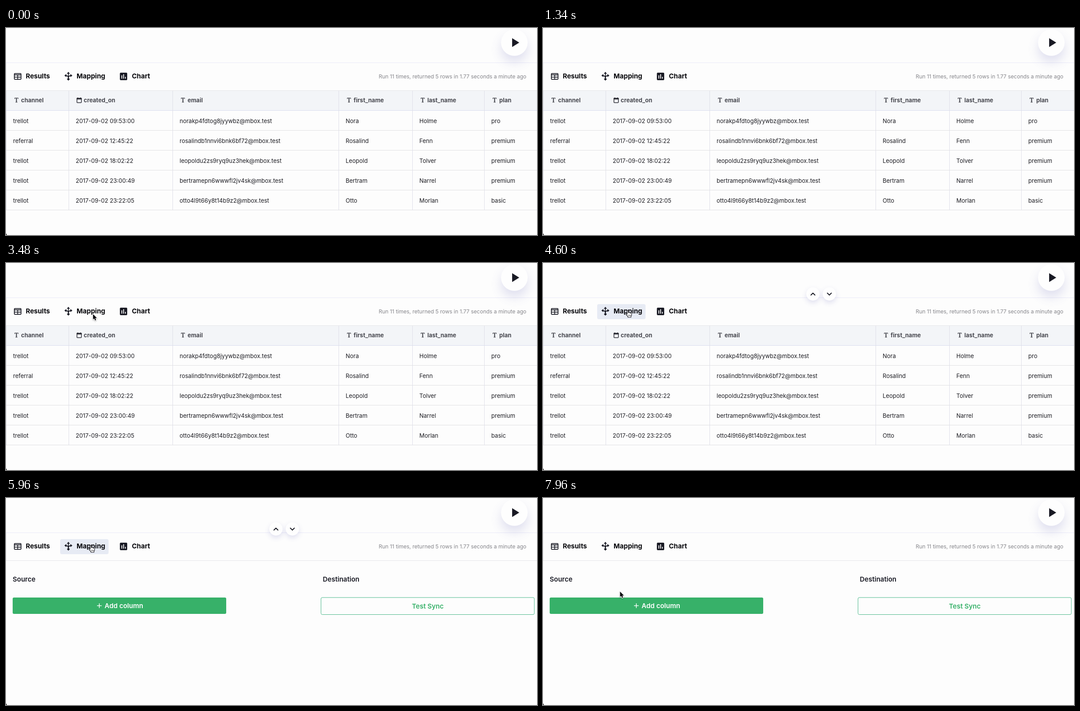
Animation of 1196x468 px, one loop 8000 ms. Source, as an HTML page with a canvas:

```html
<!DOCTYPE html>
<html lang="en">
<head>
<meta charset="utf-8">
<title>Query results and mapping</title>
<style>
  html, body { margin: 0; width: 100%; height: 100%; overflow: hidden; background: #fdfdfd; }
  canvas { display: block; width: 1196px; height: 468px; }
</style>
</head>
<body>
<canvas id="stage" width="1196" height="468"></canvas>
<script>
const ctx = document.getElementById('stage').getContext('2d');
const W = 1196, H = 468, LOOP = 8000;
const PAPER = '#fdfdfd', INK = '#191a24', GREEN = '#37b169';

const TIME = { cursorIn: 2340, hoverOn: 4440, mapping: 5950, hoverOff: 7100 };

const columns = [
  { x: 0, name: 'channel' },
  { x: 141, name: 'created_on', date: true },
  { x: 375, name: 'email' },
  { x: 749, name: 'first_name' },
  { x: 915, name: 'last_name' },
  { x: 1077, name: 'plan' }
];
const rows = [
  ['trellot', '2017-09-02 09:53:00', 'norakp4fdtog8jyywbz@mbox.test', 'Nora', 'Holme', 'pro'],
  ['referral', '2017-09-02 12:45:22', 'rosalindb1nnvi6bnk6bf72@mbox.test', 'Rosalind', 'Fenn', 'premium'],
  ['trellot', '2017-09-02 18:02:22', 'leopoldu2zs9ryq9uz3hek@mbox.test', 'Leopold', 'Tolver', 'premium'],
  ['trellot', '2017-09-02 23:00:49', 'bertramepn6wwwfl2jv4sk@mbox.test', 'Bertram', 'Narrel', 'premium'],
  ['trellot', '2017-09-02 23:22:05', 'otto4l9t66y8t14b9z2@mbox.test', 'Otto', 'Morlan', 'basic']
];

// Cursor hot spot over time: [ms, x, y]
const route = [
  [2340, 322, 214], [2480, 308, 188], [2600, 308, 188], [3380, 195.5, 115],
  [3600, 195.5, 115], [4440, 191, 107], [6840, 191, 107], [7700, 173, 211]
];

const clamp = v => Math.max(0, Math.min(1, v));
const ease = v => v * v * (3 - 2 * v);

function cursorAt(t) {
  let a = route[0];
  for (const b of route) {
    if (t < b[0]) {
      const k = ease(clamp((t - a[0]) / (b[0] - a[0])));
      return [a[1] + (b[1] - a[1]) * k, a[2] + (b[2] - a[2]) * k];
    }
    a = b;
  }
  return [a[1], a[2]];
}

function text(str, x, y, size, weight, color, align = 'left') {
  ctx.font = `${weight} ${size}px Inter, sans-serif`;
  ctx.textAlign = align;
  ctx.fillStyle = color;
  ctx.fillText(str, x, y);
}

function rect(x, y, w, h, color) {
  ctx.fillStyle = color;
  ctx.fillRect(x, y, w, h);
}

function roundBox(x, y, w, h, r, fill, stroke, line = 1) {
  ctx.beginPath();
  ctx.roundRect(x, y, w, h, r);
  if (fill) { ctx.fillStyle = fill; ctx.fill(); }
  if (stroke) { ctx.strokeStyle = stroke; ctx.lineWidth = line; ctx.stroke(); }
}

function poly(points, fill) {
  ctx.beginPath();
  points.forEach(([x, y]) => ctx.lineTo(x, y));
  ctx.closePath();
  ctx.fillStyle = fill;
  ctx.fill();
}

function strokePath(d, color, width) {
  ctx.strokeStyle = color;
  ctx.lineWidth = width;
  ctx.stroke(new Path2D(d));
}

function disc(x, y, r, offset, blur, shadow) {
  ctx.save();
  ctx.shadowColor = shadow;
  ctx.shadowOffsetY = offset;
  ctx.shadowBlur = blur;
  ctx.beginPath();
  ctx.arc(x, y, r, 0, Math.PI * 2);
  ctx.fillStyle = '#fefefe';
  ctx.fill();
  ctx.restore();
}

function tableIcon() {
  roundBox(18.8, 102.8, 15, 13.4, 1.5, null, INK, 1.8);
  rect(18.8, 105, 15, 1.8, INK);
  rect(18.8, 110.3, 15, 1.6, INK);
  rect(25.5, 106, 1.7, 10, INK);
}

function mappingIcon() {
  strokePath('M140.5 115V103 M135 107.5Q140.5 108 140.5 114 M146 107.5Q140.5 108 140.5 114', INK, 1.8);
  poly([[140.5, 99], [144, 103.5], [137, 103.5]], INK);
  poly([[131.5, 107.5], [136, 104], [136, 111]], INK);
  poly([[149.5, 107.5], [145, 104], [145, 111]], INK);
  poly([[140.5, 112.5], [143.8, 115.8], [140.5, 119], [137.2, 115.8]], INK);
}

function chartIcon() {
  roundBox(256.5, 101, 16.5, 17, 2, INK);
  rect(260, 107, 1.8, 7.5, '#fff');
  rect(264, 104.5, 1.8, 10, '#fff');
  rect(268, 110.5, 1.8, 4, '#fff');
}

function playButton() {
  disc(1145, 33, 30, 14, 24, 'rgba(95,95,180,.19)');
  poly([[1140, 23], [1156, 33], [1140, 43]], INK);
}

function tabBar(hover) {
  if (hover) {
    ctx.globalAlpha = hover;
    roundBox(122, 93, 109, 34, 4, '#e7ebf4');
    ctx.globalAlpha = 1;
  }
  tableIcon();
  mappingIcon();
  chartIcon();
  text('Results', 44.5, 113.5, 15, 700, '#08080c');
  text('Mapping', 159, 113.5, 15, 700, '#08080c');
  text('Chart', 283.5, 113.5, 15, 700, '#08080c');
  text('Run 11 times, returned 5 rows in 1.77 seconds a minute ago', 1172, 113.5, 12, 400, '#85858a', 'right');
}

function chevrons(alpha) {
  if (!alpha) return;
  ctx.save();
  ctx.globalAlpha = alpha;
  for (const x of [608, 645]) disc(x, 70, 15, 5, 12, 'rgba(95,95,180,.19)');
  ctx.lineCap = ctx.lineJoin = 'round';
  strokePath('M603.5 72.5L608 68L612.5 72.5 M640.5 68L645 72.5L649.5 68', INK, 2);
  ctx.restore();
}

function calendarIcon(x, y) {
  roundBox(x + .75, y + 1.75, 10, 10, 1, null, '#2c2d35', 1.5);
  rect(x, y + 1, 11.5, 3.5, '#2c2d35');
  rect(x + 2, y, 1.5, 2, '#2c2d35');
  rect(x + 8, y, 1.5, 2, '#2c2d35');
}

function tableView() {
  rect(0, 142, W, 44, '#f3f5f8');
  for (let i = 0; i < 6; i++) rect(0, 186 + i * 45, W, 1, i ? '#e0e0e2' : '#d8dcee');
  for (const { x, name, date } of columns) {
    rect(x, 142, 1, 270, '#dedee8');
    if (date) calendarIcon(x + 18, 157);
    else {
      ctx.font = '14px "Liberation Serif", serif';
      ctx.textAlign = 'center';
      ctx.fillStyle = ctx.strokeStyle = '#34353c';
      ctx.lineWidth = .4;
      ctx.fillText('T', x + 23.5, 168);
      ctx.strokeText('T', x + 23.5, 168);
    }
    text(name, x + 34, 167.5, 13, 700, '#484950');
  }
  rows.forEach((row, r) => row.forEach((cell, c) =>
    text(cell, columns[c].x + 16, 214.5 + r * 45, 13, 400, '#1c1c22')));
}

function mappingView() {
  text('Source', 15, 189, 15, 600, INK);
  text('Destination', 713.5, 189, 15, 600, INK);
  roundBox(15, 225, 481, 37, 3, GREEN);
  strokePath('M205 243.5H215.5 M210.25 238.2V248.8', '#fff', 1.5);
  text('Add column', 222, 249, 15, 600, '#fff');
  roundBox(709.5, 225, 480.5, 38.5, 3, PAPER, '#45b586');
  text('Test Sync', 950, 250, 15, 600, GREEN, 'center');
}

function arrowCursor(x, y) {
  ctx.save();
  ctx.translate(x, y);
  const shape = new Path2D('M.5 .5V12.8L3.3 10.3L5.2 15L7.4 14.1L5.5 9.5H9.3Z');
  ctx.shadowColor = 'rgba(0,0,0,.25)';
  ctx.shadowBlur = 3;
  ctx.shadowOffsetY = 1.5;
  ctx.lineJoin = 'round';
  ctx.lineWidth = 2;
  ctx.strokeStyle = '#fff';
  ctx.stroke(shape);
  ctx.shadowColor = 'transparent';
  ctx.fillStyle = '#0b0b0f';
  ctx.fill(shape);
  ctx.restore();
}

function handCursor(x, y) {
  ctx.save();
  ctx.translate(x, y);
  const shape = new Path2D('M-1.3 9V1Q-1.3 -.2 0 -.2T1.3 1V5.2Q3.4 4.4 4 5.8Q5.8 5 6.4 6.6Q8.4 6 8.6 8V11L7.2 13.4V15.8H.2V14L-4 9.5Q-4.6 8 -3 7.8Z');
  ctx.fillStyle = '#fff';
  ctx.fill(shape);
  ctx.lineJoin = 'round';
  ctx.lineWidth = 1.1;
  ctx.strokeStyle = '#16161c';
  ctx.stroke(shape);
  strokePath('M1.8 10V13 M3.9 10V13 M6 10V13', '#16161c', .8);
  ctx.restore();
}

function draw(t) {
  const hover = clamp((t - TIME.hoverOn) / 150) * (1 - clamp((t - TIME.hoverOff) / 150));
  rect(0, 0, W, H, PAPER);
  rect(0, 78, W, 1, '#e9e9f8');
  rect(0, 79, 1, 62, '#f0f0f6');
  playButton();
  chevrons(hover);
  tabBar(hover);
  rect(0, 141, W, 1, '#e5e5e8');
  if (t < TIME.mapping) tableView(); else mappingView();
  poly([[0, 464], [0, 468], [2, 468]], '#111');
  if (t >= TIME.cursorIn) {
    const pointing = t >= TIME.hoverOn && t < TIME.hoverOff;
    (pointing ? handCursor : arrowCursor)(...cursorAt(t));
  }
}

const start = performance.now();
function tick() {
  draw((performance.now() - start) % LOOP);
  requestAnimationFrame(tick);
}
tick();
</script>
</body>
</html>
```
